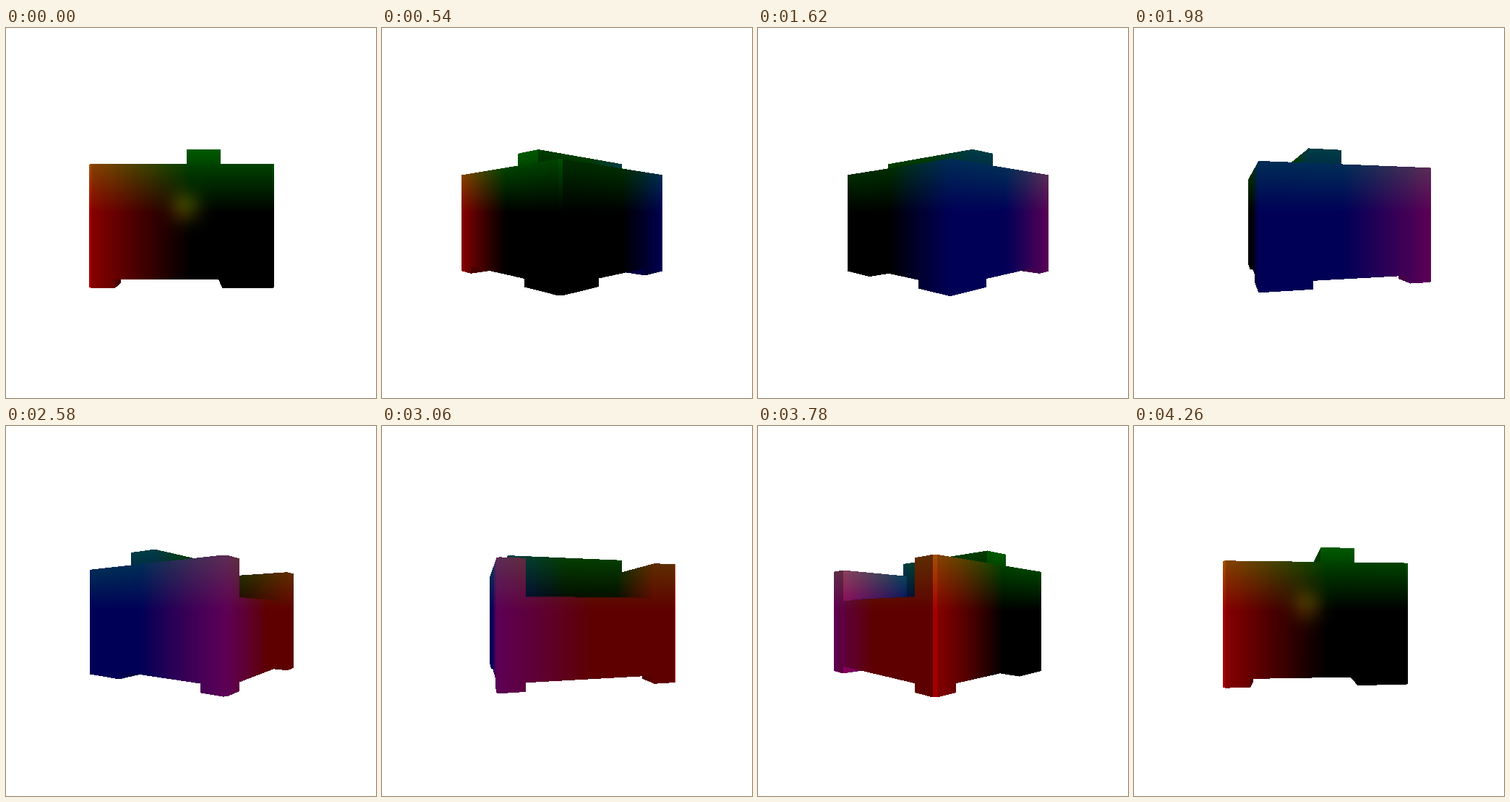
Write an HTML page with a canvas that moves like this. It is 512x512 px and loops after 4320 ms.

```html
<!DOCTYPE html>
<html>
<head>
<meta charset="utf-8">
<style>
html, body { margin: 0; height: 100%; overflow: hidden; background: #fff; }
canvas { display: block; }
</style>
</head>
<body>
<canvas id="stage" width="512" height="512"></canvas>
<script>
const SIZE = 512, MID = 256, DIST = 462;
const STEP_MS = 60, STEPS = 72;
const ctx = document.getElementById('stage').getContext('2d');
const image = ctx.createImageData(SIZE, SIZE);
const pixels = new Uint32Array(image.data.buffer);

// Armchair extents: front and back, both sides, inner arms, heights
const F = -111, B = 91, L = -101.2, R = 100.3, ARM_L = -73, ARM_R = 71.5;
const TOP = 53.2, RAIL = -72.2, FLOOR = -81.4, BEVEL = 3;

// x0, x1, z0, z1, bottom, top; every box crosses eye level,
// so only its upright sides can be seen
const boxes = [
  [F, B, L, R, RAIL, 13.3],
  [-96, B, L, R, RAIL, 15.4],
  [F, B, ARM_R, R, RAIL, TOP],
  [F, B, L, ARM_L, RAIL, TOP],
  [-5, B, L, R, RAIL, TOP],
  [-5, 34, -81.5, 80.5, 0, 72.6],
  [F, -82.2, ARM_R, R, FLOOR, 0],
  [F, -82.2, L, ARM_L, FLOOR, 0],
  [33.8, B, 42, R, FLOOR, 0],
  [33.8, B, L, -53, FLOOR, 0]
];

// A fixed lamp on the +z side brightens what faces it
const AMBIENT = 0.85, LIT = 1.25, GLINT = 1.5;

// Where a ray in plan enters a box with bevelled outer corners
function enter(ox, oz, dx, dz, [x0, x1, z0, z1, low, high]) {
  const slabs = [
    [ox, dx, x0, x1, AMBIENT],
    [oz, dz, z0, z1, LIT],
    [oz + ox, dz + dx, L + F + BEVEL, R + B - BEVEL, GLINT],
    [oz - ox, dz - dx, L - B + BEVEL, R - F - BEVEL, GLINT]
  ];
  let t = -Infinity, far = Infinity, light;
  for (const [o, d, lo, hi, lamp] of slabs) {
    const a = (lo - o) / d, b = (hi - o) / d;
    far = Math.min(far, Math.max(a, b));
    if (Math.min(a, b) > t) {
      t = Math.min(a, b);
      light = d < 0 ? lamp : AMBIENT;
    }
  }
  return t < far && { t, light, low, high, x: ox + dx * t, z: oz + dz * t };
}

function draw(step) {
  const turn = step * 2 * Math.PI / STEPS;
  const c = Math.cos(turn), s = Math.sin(turn);
  const offset = step > STEPS / 2 ? step - STEPS : step;
  const glow = 48 * Math.max(0, 1 - Math.abs(offset) / 5);
  const glowX = 248 + 9 * offset;
  pixels.fill(0xffffffff);

  for (let px = 90; px < 422; px++) {
    const u = (px + 0.5 - MID) / DIST;
    const ox = DIST * s, oz = DIST * c;
    const dx = u * c - s + 1e-9, dz = -u * s - c + 1e-8;
    const hits = boxes
      .map(box => enter(ox, oz, dx, dz, box))
      .filter(Boolean)
      .sort((a, b) => a.t - b.t);
    if (!hits.length) continue;

    for (let py = 150; py < 390; py++) {
      const v = (MID - py - 0.5) / DIST;
      const hit = hits.find(h => v * h.t >= h.low && v * h.t <= h.high);
      if (!hit) continue;
      let r = Math.max(0, -hit.x) * hit.light;
      let g = Math.max(0, v * hit.t) * hit.light;
      const b = Math.max(0, -hit.z) * hit.light;
      if (glow && hit.z > R - 0.1) {
        const d2 = (px - glowX) ** 2 + (py - 247) ** 2;
        const shine = glow * Math.exp(-d2 / 480);
        r += shine;
        g += shine;
      }
      pixels[py * SIZE + px] = 0xff000000 | b << 16 | g << 8 | r;
    }
  }
  ctx.putImageData(image, 0, 0);
}

const start = performance.now();
let shown = -1;
function tick() {
  const step = Math.floor((performance.now() - start) / STEP_MS) % STEPS;
  if (step !== shown) draw(shown = step);
  requestAnimationFrame(tick);
}
tick();
</script>
</body>
</html>
```
